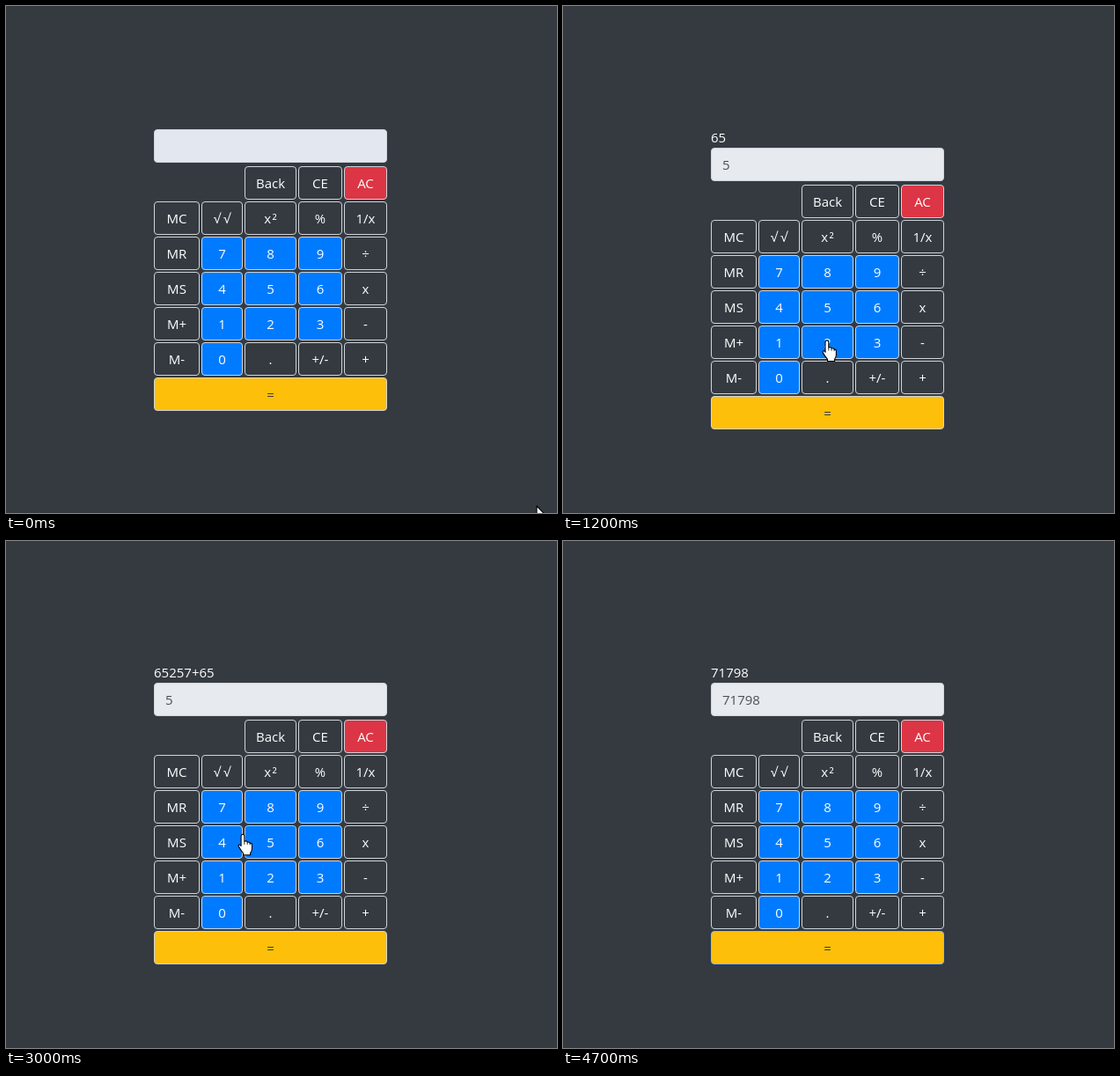
Animation, 626 px wide and 576 px high, one loop 4800 ms. Source, as an HTML page:

```html
<!DOCTYPE html>
<html lang="en">
<head>
<meta charset="utf-8">
<title>Calculator</title>
<style>
  html, body { margin: 0; width: 100%; height: 100%; overflow: hidden; background: #343a40; }
  body { position: relative; font: 500 15px/36px "Open Sans", "Noto Sans", "DejaVu Sans", sans-serif; color: #fff; }
  #history { position: absolute; left: 168px; top: 137px; line-height: 24px; white-space: pre; }
  #calc { position: absolute; left: 168px; top: 161px; width: 265px; }
  #calc.empty { top: 140px; }
  #display, .key { box-sizing: border-box; height: 38px; border: 1px solid #ced4da; border-radius: 4px; }
  #display { padding-left: 12px; margin-bottom: 4px; background: #e7eaee; color: #495057; font-weight: 400; white-space: pre; }
  .empty #display { background: #e3e7ef; }
  #keys { display: grid; grid-template-columns: 52px 47px 59px 50px 49px; grid-auto-rows: 38px; gap: 2px; }
  .key { text-align: center; white-space: nowrap; }
  .digit { background: #007bff; }
  .clear { background: #dc3545; }
  .equals { grid-column: 1 / -1; background: #fdbf09; color: #343a40; font-weight: 400; }
  .focus { border-color: #a7c8ec; }
  .equals.focus { border-color: #80bdff; }
  .glow { box-shadow: 0 0 0 3px rgba(0, 123, 255, .25); }
  #cursor { position: absolute; left: 0; top: 0; width: 100%; height: 100%; overflow: hidden; }
  #cursor path { fill: #fff; stroke: #000; stroke-width: 1.1; stroke-linejoin: round; }
  #cursor .fold { fill: none; stroke-width: .8; }
</style>
</head>
<body>
<div id="history"></div>
<div id="calc">
  <div id="display"></div>
  <div id="keys"></div>
</div>
<svg id="cursor">
  <g id="arrow">
    <path d="M0 0V17l4-3.5 2.7 6.3 2.6-1.1-2.7-6.1h5.4z"/>
  </g>
  <g id="hand">
    <g transform="translate(-6 -.8)">
      <path d="M3.5 14V2.5a1.9 1.9 0 0 1 3.8 0V8.6q3-1 3.3 1 2.5-.7 3 1.2 2.3-.3 2.3 2v4q0 3-1.8 5v2.3H6v-2Q3 18.5.8 14.5q-.8-2 1-2.2 1 0 1.7 1.7z"/>
      <path class="fold" d="M7.3 8.6v3.6M10.6 9.6v2.8M13.6 10.8v2"/>
    </g>
  </g>
</svg>
<script>
  const LOOP = 4800, STEP = 100;
  const FIRST_CLICK = 600, CLICK_GAP = 310, REST = 155;
  const HIDE_CURSOR = 4100, END_GLOW = 4700;
  const DROP = 21; // the panel moves down once there is a history line
  const typing = '65257+6541=';
  const entry = { x: 603, y: 568 };
  // where the pointer lands, relative to the middle of a key
  const aim = { 6: [-5, -14], 4: [-10, -18], '+': [22, -1], '=': [7, 18] };

  const $ = id => document.getElementById(id);
  const calc = $('calc');
  const keys = {};
  const labels = 'Back CE AC MC √√ x² % 1/x MR 7 8 9 ÷ MS 4 5 6 x M+ 1 2 3 - M- 0 . +/- + ='.split(' ');
  for (const label of labels) {
    const key = document.createElement('div');
    key.className = 'key';
    key.textContent = label.replace('√√', '√\u2009√').replace('x²', 'x\u200a²');
    if (/^\d$/.test(label)) key.classList.add('digit');
    if (label === 'AC') key.classList.add('clear');
    if (label === '=') key.classList.add('equals');
    if (label === 'Back') key.style.gridColumn = 3;
    keys[label] = key;
    $('keys').append(key);
  }

  const stops = [...typing].map((label, i) => {
    const key = keys[label], [dx, dy] = aim[label] || [0, 0];
    return {
      x: calc.offsetLeft + key.offsetLeft + key.offsetWidth / 2 + dx,
      y: calc.offsetTop + key.offsetTop + key.offsetHeight / 2 + dy - (i ? 0 : DROP)
    };
  });
  const edge = {
    x: calc.offsetLeft + calc.offsetWidth,
    y: calc.offsetTop + calc.offsetHeight + 1
  };

  const clickTime = i => FIRST_CLICK + CLICK_GAP * i;
  const countAt = t => Math.min(typing.length, Math.max(0, Math.floor((t - FIRST_CLICK) / CLICK_GAP) + 1));
  const ease = u => u * u * (3 - 2 * u);

  // rest on a key after the click, then glide to the next one
  function pointAt(t) {
    const n = countAt(t);
    const from = n ? stops[n - 1] : entry;
    const to = stops[n] || from;
    const leave = n ? clickTime(n - 1) + REST : 0;
    const u = Math.min(1, Math.max(0, (t - leave) / (clickTime(n) - leave)));
    const k = ease(u);
    return { x: from.x + (to.x - from.x) * k, y: from.y + (to.y - from.y) * k };
  }

  function textAt(typed) {
    const last = typed.slice(-1);
    if (last === '=') {
      const sum = typed.slice(0, -1).split('+').reduce((a, b) => a + Number(b), 0);
      return [sum, sum];
    }
    return [typed, last === '+' ? typed : last];
  }

  function draw(t) {
    const typed = typing.slice(0, countAt(t));
    const last = typed.slice(-1);
    const [history, display] = textAt(typed);
    $('history').textContent = history;
    $('display').textContent = display;
    calc.classList.toggle('empty', !last);
    for (const label in keys) keys[label].classList.toggle('focus', label === last);
    keys['='].classList.toggle('glow', last === '=' && t < END_GLOW);

    const { x, y } = pointAt(t);
    const over = x < edge.x && y < edge.y;
    $('cursor').style.display = t < HIDE_CURSOR ? '' : 'none';
    for (const id of ['arrow', 'hand']) {
      $(id).setAttribute('transform', `translate(${x} ${y})`);
      $(id).style.display = (id === 'hand') === over ? '' : 'none';
    }
  }

  const start = performance.now();
  function tick() {
    const t = (performance.now() - start) % LOOP;
    draw(Math.floor(t / STEP) * STEP);
    requestAnimationFrame(tick);
  }
  tick();
</script>
</body>
</html>
```
